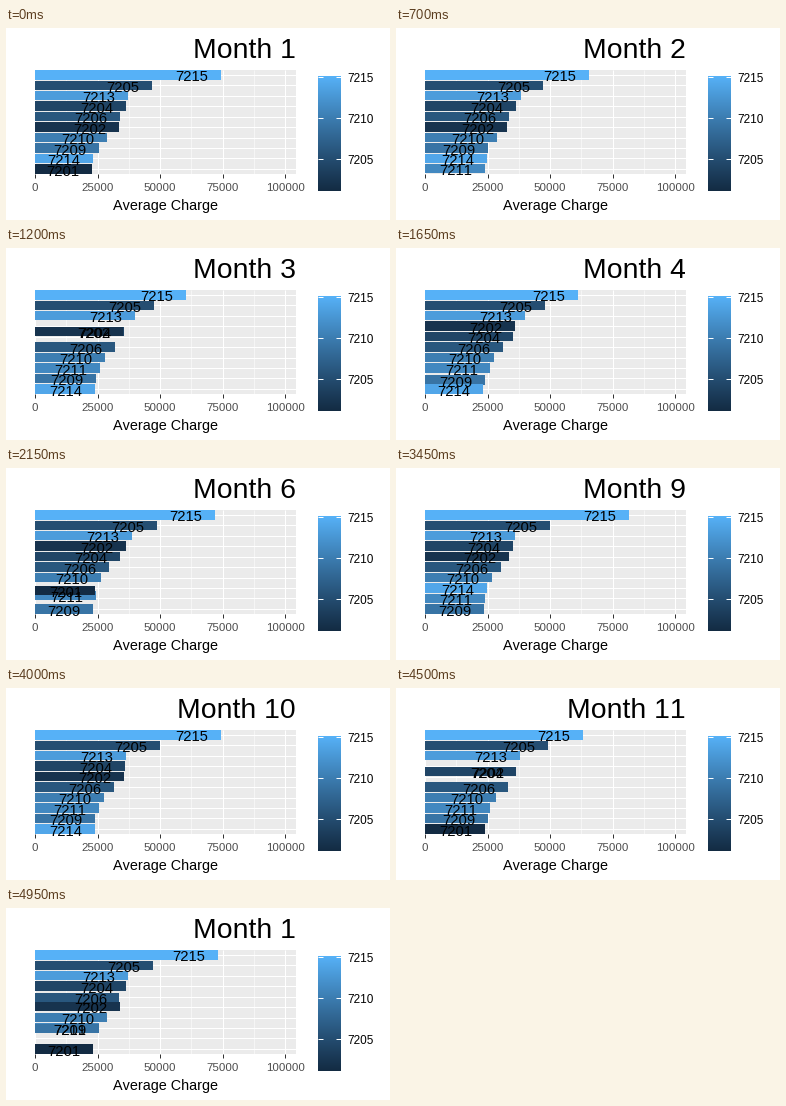
A matplotlib script that plays this animation: 384x192 px, repeating every 5 s.

```python
import numpy as np
import matplotlib.pyplot as plt
from matplotlib.animation import FuncAnimation
from matplotlib.patches import Rectangle

plt.rcParams["font.family"] = "Liberation Sans"
plt.rcParams["text.kerning_factor"] = 6

W, H, DPI = 384, 192, 96
FRAMES, INTERVAL = 100, 50
LEFT, RIGHT, TOP, BOTTOM = 29, 290, 42, 146
ROW_1, ROW_STEP = 46.85, 10.45
PX_PER_THOUSAND = 2.504
MONTHS, SHOWN = 12, 10

# Each department's charge swings as a wave: mean and swing in thousands,
# peak month, period in months
WAVES = {
    7201: (22.7, 1.55, 5.5, 5.8),
    7202: (34.9, 2.0, 5, 6.2),
    7204: (35.15, 1.3, 1.5, 10),
    7205: (48.4, 1.5, 9, 16),
    7206: (31.5, 2.3, 1, 12),
    7209: (24.15, 1.4, 1, 12),
    7210: (27.5, 1.3, 1, 12),
    7211: (24.4, 1.9, 4, 7),
    7213: (37.9, 2.1, 4, 10),
    7214: (22.9, 2.0, 2.5, 6.5),
    7215: (72.0, 12.5, 8, 9),
}
# Start frame and length of the move out of each month
STARTS = [0, 13, 22, 31, 40, 48, 57, 64, 72, 80, 87, 96]
LENGTHS = [9, 7, 4, 6, 5, 9, 4, 5, 8, 7, 6, 4]

RGB_TO_XYZ = np.array([[0.4124, 0.3576, 0.1805],
                       [0.2126, 0.7152, 0.0722],
                       [0.0193, 0.1192, 0.9505]])
WHITE = RGB_TO_XYZ.sum(axis=1)


def to_lab(rgb):
    rgb = np.array(rgb) / 255
    lin = np.where(rgb > 0.04045, ((rgb + 0.055) / 1.055) ** 2.4, rgb / 12.92)
    t = RGB_TO_XYZ @ lin / WHITE
    x, y, z = np.where(t > 0.008856, np.cbrt(t), 7.787 * t + 16 / 116)
    return np.array([116 * y - 16, 500 * (x - y), 200 * (y - z)])


def from_lab(lab):
    y = (lab[0] + 16) / 116
    f = np.array([y + lab[1] / 500, y, y - lab[2] / 200])
    xyz = np.where(f > 0.2069, f ** 3, (f - 16 / 116) / 7.787) * WHITE
    lin = np.clip(np.linalg.solve(RGB_TO_XYZ, xyz), 0, 1)
    return np.where(lin > 0.0031308, 1.055 * lin ** (1 / 2.4) - 0.055, lin * 12.92)


LOW, HIGH = to_lab((19, 43, 67)), to_lab((86, 177, 247))


def shade(dept):
    t = (dept - 7201) / 14
    return tuple(np.clip(from_lab(LOW + t * (HIGH - LOW)), 0, 1))


def charge(dept, month):
    mean, swing, peak, period = WAVES[dept]
    return mean + swing * np.cos(2 * np.pi * (month - peak) / period)


def ranking(month):
    return sorted(WAVES, key=lambda d: -charge(d, month))[:SHOWN]


def ease(t):
    return 4 * t ** 3 if t < 0.5 else 1 - 4 * (1 - t) ** 3


def x_of(thousands):
    return LEFT - 0.1 + thousands * PX_PER_THOUSAND


def y_of(rank):
    return ROW_1 + ROW_STEP * rank


RANKINGS = {m: ranking(m) for m in range(1, MONTHS + 1)}

fig = plt.figure(figsize=(W / DPI, H / DPI), dpi=DPI, facecolor="white")
ax = fig.add_axes([0, 0, 1, 1])


def line(xs, ys, color="white", width=0.75, z=1):
    ax.plot(xs, ys, color=color, lw=width, zorder=z, solid_capstyle="butt")


def draw_panel():
    ax.add_patch(Rectangle((LEFT, TOP), RIGHT - LEFT, BOTTOM - TOP,
                           fc="#EBEBEB", lw=0, zorder=0))
    for value in np.arange(12.5, 100, 25):
        line([x_of(value)] * 2, [TOP, BOTTOM], width=0.4)
    for rank in range(SHOWN):
        line([LEFT, RIGHT], [y_of(rank)] * 2)
    for value in range(0, 101, 25):
        x = x_of(value)
        line([x, x], [TOP, BOTTOM])
        line([x, x], [BOTTOM, BOTTOM + 3.7], color="#333333")
        ax.text(x, 162.9, str(value * 1000), size=8.6, color="#4D4D4D", ha="center")
    ax.text((LEFT + RIGHT) / 2, 182, "Average Charge", size=10.8, ha="center")


def draw_legend():
    x0, x1, y0, y1 = 312, 335, 48, 163
    ramp = np.array([[shade(d)] for d in np.linspace(7215, 7201, y1 - y0)])
    ax.imshow(ramp, extent=(x0, x1, y1, y0), aspect="auto",
              interpolation="nearest", zorder=1)
    for dept in (7215, 7210, 7205):
        y = y0 + 1.2 + (7215 - dept) / 14 * (y1 - y0)
        line([x0, x0 + 4.6], [y, y], z=2)
        line([x1 - 4.6, x1], [y, y], z=2)
        ax.text(341.5, y + 4.3, str(dept), size=8.8)


draw_panel()
draw_legend()
title = ax.text(0, 30, "", size=21.25)
bars, labels = {}, {}
for dept in WAVES:
    bars[dept] = ax.add_patch(Rectangle((x_of(0), 0), 0, 0.9 * ROW_STEP,
                                        fc=shade(dept), lw=0))
    labels[dept] = ax.text(0, 0, str(dept), size=11.1)
ax.set_xlim(0, W)
ax.set_ylim(H, 0)
ax.axis("off")


def pose(frame):
    """Month moved from, month moved to, and progress between them."""
    i = np.searchsorted(STARTS, frame, side="right") - 1
    here, there = i + 1, (i + 1) % MONTHS + 1
    t = (frame - STARTS[i]) / LENGTHS[i]
    return (there, there, 0) if t >= 1 else (here, there, ease(t))


def update(frame):
    here, there, t = pose(frame)
    name = str(there if t > 0.5 else here)
    title.set_text("Month " + name)
    title.set_x(RIGHT - 87 - 15.9 * len(name))

    now, then = RANKINGS[here], RANKINGS[there]
    for dept in WAVES:
        shown = dept in now
        bars[dept].set_visible(shown)
        labels[dept].set_visible(shown)
        if not shown:
            continue
        rank, value = now.index(dept), charge(dept, here)
        bars[dept].set_zorder(10 + rank)
        labels[dept].set_zorder(40 + rank)
        # Departments about to leave keep their place until the move ends
        if dept in then:
            rank += t * (then.index(dept) - rank)
            value += t * (charge(dept, there) - value)
        y = y_of(rank)
        bars[dept].set_y(y - 0.45 * ROW_STEP)
        bars[dept].set_width(x_of(value) - x_of(0))
        labels[dept].set_position((x_of(value) - 45.7, y + 6.6))
    return [title, *bars.values(), *labels.values()]


anim = FuncAnimation(fig, update, frames=FRAMES, interval=INTERVAL,
                     init_func=lambda: update(0), repeat=True, repeat_delay=0)
plt.show()
```
